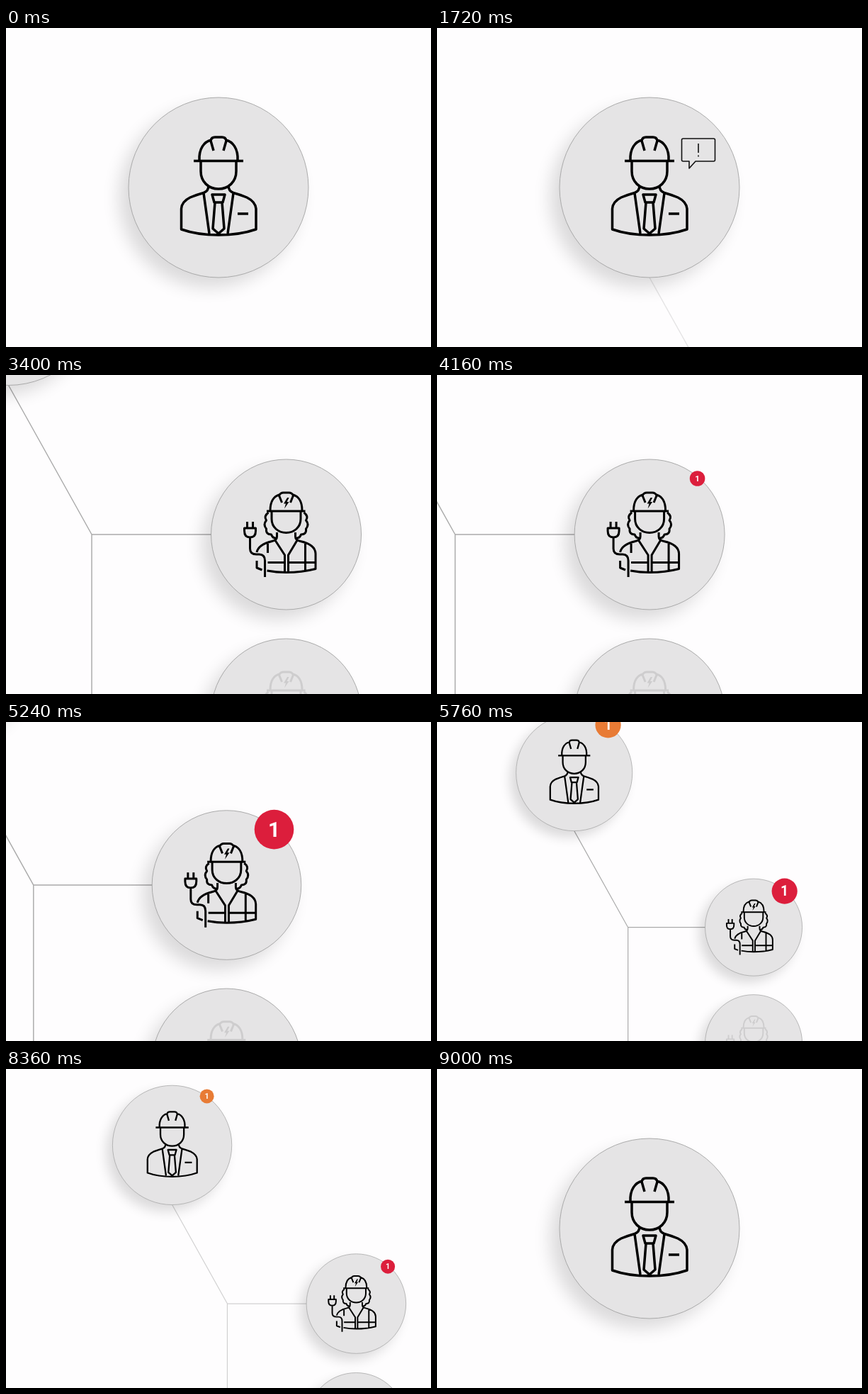
Animation, 600 px wide and 450 px high, one loop 9880 ms. Source, as an HTML page with a canvas:

```html
<!DOCTYPE html>
<html lang="en">
<head>
<meta charset="utf-8">
<title>Alert passed down the team</title>
<style>
html, body { margin: 0; width: 100%; height: 100%; overflow: hidden; background: #fefdfe; }
canvas { display: block; width: 600px; height: 450px; }
</style>
</head>
<body>
<canvas id="stage" width="600" height="450"></canvas>
<script>
const ctx = document.getElementById('stage').getContext('2d');
const LOOP = 9880;

// World layout at zoom 1
const boss = { x: 300, y: 225, r: 127 };
const worker = { x: 692, y: 562.5, r: 106 };
const joint = { x: 417.5, y: 562.5 };
const GAP = 253;
const overview = { x: 421.6, y: 443.6, s: 0.555 };

// Icons are drawn around the circle centre (300, 225)
const managerIcon = new Path2D(`
  M265 187.5H335 M273 187C272 170 280 160 290 158 M310 158C320 160 328 170 327 187
  M293 173L289 159Q290 154 295 154H305Q310 154 311 159L307 173
  M275 188V202C275 217 286 227 300 227C314 227 325 217 325 202V188
  M286 222Q286 230 279 232.5Q270 235 260 239Q248 245 247.5 255V284Q270 292 300 292
  Q330 292 353 284V255Q352 245 340 239Q330 235 321 232.5Q314 230 314 222
  M279 233L287 290 M321 233L313 290
  M291 235H309L306 246H294Z M295 246L292 283L300 290L308 283L305 246 M327 262H342`);
const workerIcon = new Path2D(`
  M272.5 192H327 M277.5 191C277.5 178 283 171 290 169 M310 169C317 171 322.5 178 322.5 191
  M294 180L290 170Q292 166 296 166H304Q308 166 310 170L306 180
  M279.5 193V203C279.5 215 289 222.5 300 222.5C311 222.5 320.5 215 320.5 203V193
  M275 194Q268 199 272 205Q267 211 272 217Q271 225 279 225Q281 231 287 230
  M325 194Q332 199 328 205Q333 211 328 217Q329 225 321 225Q319 231 313 230
  M287 222V228Q287 233 280 234.5Q261 239 258.5 250
  M313 222V228Q313 233 320 234.5Q341 239 341.5 252V273.5Q322 278.5 300 278.5Q286 278.5 273 276
  M258.5 262V272L266 275 M285 234L298 254V278 M315 234L303 254V278
  M274 238V251 M327 238V276 M274 264.5H298 M303 264.5H341
  M241 216H257V220Q257 229 249 229Q241 229 241 220Z M245 207V215 M253 207V215
  M249 229V245Q249 253 258 253H262Q270 253 270 262V285`);
const bolt = new Path2D('M301.5 173L296.5 181.5H299.5L297.5 188.5L304 179H301L304 173Z');
const bubblePath = new Path2D(`M-21.5 -16H21.5Q23.5 -16 23.5 -14V14Q23.5 16 21.5 16
  H-4L-13 26V16H-21.5Q-23.5 16 -23.5 14V-14Q-23.5 -16 -21.5 -16Z`);
const bang = new Path2D('M0 -9V4 M0 7.5V9.5');

const ramp = (t, a, b) => Math.min(1, Math.max(0, (t - a) / (b - a)));
const mix = (a, b, p) => a + (b - a) * p;
function ease(t, a, b) {
  const u = ramp(t, a, b);
  return u < 0.5 ? 4 * u ** 3 : 1 - 4 * (1 - u) ** 3;
}

// Point at distance d from a, going through b and on to c
function along(a, b, c, d) {
  const len = Math.hypot(b.x - a.x, b.y - a.y);
  if (d > len) return { x: b.x + (d - len) * Math.sign(c.x - b.x), y: b.y };
  return { x: mix(a.x, b.x, d / len), y: mix(a.y, b.y, d / len) };
}

function camera(t) {
  if (t < 4980) {
    const length = Math.hypot(joint.x - boss.x, joint.y - boss.y) + worker.x - joint.x;
    return { ...along(boss, joint, worker, length * ease(t, 1740, 4240)), s: 1 };
  }
  const from = t < 8000 ? worker : boss;
  const p = t < 8000 ? ease(t, 4980, 6165) : 1 - ease(t, 8000, 9000);
  return {
    x: mix(from.x, overview.x, p),
    y: mix(from.y, overview.y, p),
    s: mix(1, overview.s, p ** 1.33)
  };
}

function placed(x, y, scale, draw) {
  if (scale <= 0) return;
  ctx.save();
  ctx.translate(x, y);
  ctx.scale(scale, scale);
  draw();
  ctx.restore();
}

function bubble(x, y, scale, fill) {
  placed(x, y, scale, () => {
    if (fill) {
      ctx.fillStyle = fill;
      ctx.fill(bubblePath);
    }
    ctx.strokeStyle = '#111';
    ctx.lineWidth = 1.6;
    ctx.stroke(bubblePath);
    ctx.stroke(bang);
  });
}

function node(x, y, r, icon, s, alpha = 1) {
  placed(x, y, 1, () => {
    ctx.beginPath();
    ctx.arc(0, 0, r, 0, 7);
    ctx.save();
    ctx.shadowColor = 'rgba(0,0,0,0.14)';
    ctx.shadowBlur = 25 * s;
    ctx.shadowOffsetX = -13 * s;
    ctx.shadowOffsetY = 14 * s;
    ctx.fillStyle = '#e5e4e5';
    ctx.fill();
    ctx.restore();
    ctx.strokeStyle = '#a3a3a3';
    ctx.lineWidth = 0.9 / Math.sqrt(s);
    ctx.stroke();

    ctx.globalAlpha = alpha;
    ctx.translate(-300, -225);
    ctx.strokeStyle = ctx.fillStyle = '#000';
    ctx.lineWidth = icon === managerIcon ? 3.5 : 3;
    ctx.stroke(icon);
    if (icon === workerIcon) ctx.fill(bolt);
  });
}

function badge(x, y, scale, color) {
  placed(x, y, scale, () => {
    ctx.fillStyle = color;
    ctx.beginPath();
    ctx.arc(0, 0, 28, 0, 7);
    ctx.fill();
    ctx.fillStyle = '#fff';
    ctx.font = '700 30px Roboto, sans-serif';
    ctx.textAlign = 'center';
    ctx.fillText('1', 0, 10.5);
  });
}

function connectors(s, alpha) {
  ctx.globalAlpha = alpha;
  ctx.strokeStyle = '#aaa';
  ctx.lineWidth = 1.45 / Math.sqrt(s);
  ctx.beginPath();
  ctx.moveTo(boss.x, boss.y + boss.r);
  ctx.lineTo(joint.x, joint.y);
  ctx.lineTo(joint.x, 1200);
  for (let i = 0; i < 3; i++) {
    ctx.moveTo(joint.x, joint.y + i * GAP);
    ctx.lineTo(worker.x, joint.y + i * GAP);
  }
  ctx.stroke();
  ctx.globalAlpha = 1;
}

function draw(t) {
  const cam = camera(t);
  const leave = 1 - ease(t, 8040, 8700);
  ctx.setTransform(1, 0, 0, 1, 0, 0);
  ctx.fillStyle = '#fefdfe';
  ctx.fillRect(0, 0, 600, 450);
  ctx.translate(300, 225);
  ctx.scale(cam.s, cam.s);
  ctx.translate(-cam.x, -cam.y);
  ctx.lineJoin = 'round';

  connectors(cam.s, ramp(t, 1690, 1790) * leave);

  // The travelling alert slips out from under one circle and under the next
  if (t > 1900 && t < 4035) {
    const start = { x: boss.x, y: boss.y + boss.r };
    const p = along(start, joint, worker, -50 + 565 * ease(t, 1900, 4035));
    bubble(p.x + 6, p.y - 11.8, 1.25, '#fefdfe');
  }

  node(boss.x, boss.y, boss.r, managerIcon, cam.s);
  for (let i = 2; i >= 0; i--) {
    node(worker.x, worker.y + i * GAP, worker.r, workerIcon, cam.s, i ? 0.1 : 1);
  }

  if (t < 4700) bubble(369, 172, ease(t, 740, 1320), null);
  else badge(boss.x + 74, boss.y - 104, leave, '#e87b35');
  const pop = 1 - (1 - ramp(t, 4040, 4600)) ** 2;
  badge(worker.x + 67.5, worker.y - 79, pop * leave, '#dc1e3c');
}

const begin = performance.now();
function tick() {
  draw((performance.now() - begin) % LOOP);
  requestAnimationFrame(tick);
}
tick();
</script>
</body>
</html>
```
